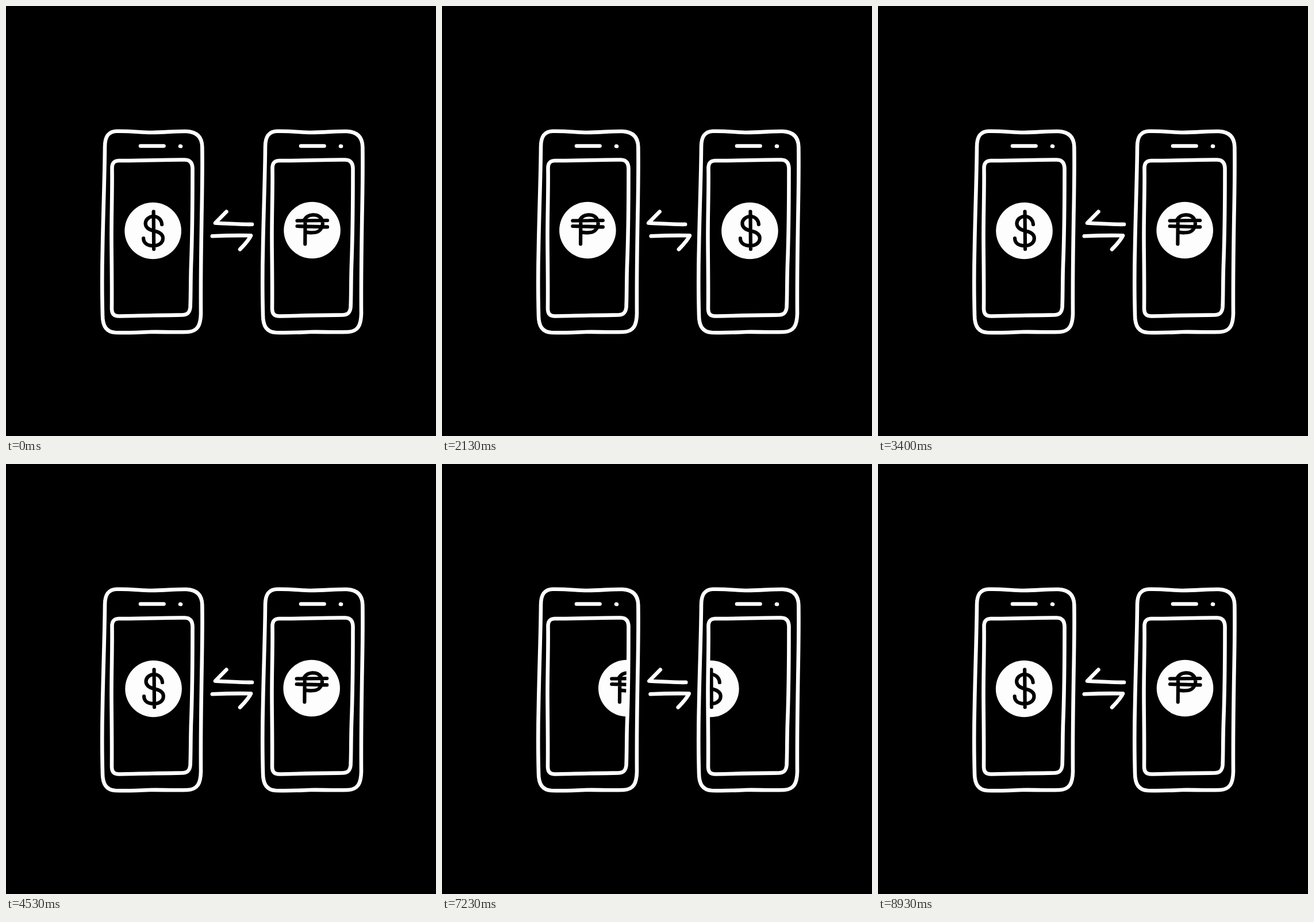
Animation, 748 px wide and 748 px high, one loop 9010 ms. Source, as an HTML page:

```html
<!DOCTYPE html>
<html lang="en">
<head>
<meta charset="utf-8">
<title>Currency swap</title>
<style>
  html, body { margin: 0; width: 100%; height: 100%; overflow: hidden; background: #000; }
  svg { display: block; width: 100%; height: 100%; }
  .line { fill: none; stroke: #fff; stroke-width: 6.6; stroke-linecap: round; stroke-linejoin: round; }
  .ink { fill: none; stroke: #000; stroke-width: 6.2; stroke-linecap: round; stroke-linejoin: round; }
  .disc { fill: #fdfdfd; }
</style>
</head>
<body>
<svg viewBox="0 0 748 748">
  <defs>
    <path id="glass" d="M184.5 284 C184 274 187 269.5 196 269 C235 269.5 275 267 311 267.5
      C321 267.5 325 274 324.5 286 C324.5 340 324 400 322 450 C321 480 321.5 505 320.5 524
      C319.5 534 315 537.5 306 537.5 C270 538 230 538.5 198 539.5 C188 540 184 536 184 526
      C184.5 480 183.5 430 183.5 400 C183.5 360 185 320 184.5 284 Z"/>
    <clipPath id="screen"><use href="#glass"/></clipPath>
    <g id="phone" class="line">
      <path d="M172 245 C172 227 178 218.5 192 217.8 C215 217 235 220 252 220 C275 220 295 217.5 314 218
        C332 219 341 228 341.3 245 C342 290 341 330 340.3 370 C339.5 420 338.5 470 339 535
        C338.5 556 333 566 316 567 C290 568 270 566.5 250 567 C230 568 205 568.5 190 568
        C174 567 168 556 168 538 C167 500 167 460 168 420 C169 360 171.5 300 172 245 Z"/>
      <use href="#glass"/>
      <path d="M234 243.5 L274.5 243.5 M303 243.8 L304 244"/>
    </g>
    <g id="dollar">
      <circle class="disc" r="49.3"/>
      <path class="ink" d="M15.5 -11 C15 -19 9 -25 1 -25 C-7 -25 -13.5 -19 -13 -12 C-12.5 -5 -7 -2 1 0
        C10 2 17.3 5 17.3 13 C17.3 21 10 26 1 26 C-9 26 -16.5 22 -16.5 13 M1 -33.5 L1.5 32"/>
    </g>
    <g id="peso">
      <circle class="disc" r="49.3"/>
      <path class="ink" d="M-12 -17 L-12.3 24 M-13.5 -18 C-8 -29 10 -29.5 16 -20 C22 -9 15 3.5 4 4
        C-2 4.5 -8 4.5 -12 3 M-26 -16.5 L26.5 -17 M-26 -7 L26.5 -5.7"/>
    </g>
  </defs>

  <rect width="748" height="748" fill="#000"/>
  <g>
    <g clip-path="url(#screen)">
      <use href="#dollar" class="dollar"/>
      <use href="#peso" class="peso"/>
    </g>
    <use href="#phone"/>
  </g>
  <g transform="translate(279 0)">
    <g clip-path="url(#screen)">
      <use href="#dollar" class="dollar" data-shift="279"/>
      <use href="#peso" class="peso" data-shift="279"/>
    </g>
    <use href="#phone"/>
  </g>
  <path id="top" class="line" d="M428 379.8 C410 380.3 385 378.3 364 377.5 L383.5 357.8"/>
  <path id="bottom" class="line" d="M358.8 400.3 C380 399.3 405 398.8 426 399.3 C422 408 414 416 407 423.3"/>
</svg>
<script>
  const LOOP = 9010, HALF = 2250, MOVE = 1500, START = -200;
  const dollars = document.querySelectorAll('.dollar');
  const pesos = document.querySelectorAll('.peso');
  const [upper, lower] = ['top', 'bottom'].map(id => document.getElementById(id));

  // cubic-bezier(.9, 0, .1, 1), solved by bisection
  function ease(u) {
    if (u <= 0) return 0;
    if (u >= 1) return 1;
    let lo = 0, hi = 1, s = 0.5;
    for (let i = 0; i < 30; i++) {
      s = (lo + hi) / 2;
      const r = 1 - s;
      if (2.7 * s * r * r + 0.3 * s * s * r + s * s * s < u) lo = s; else hi = s;
    }
    return s * s * (3 - 2 * s);
  }

  // 0: dollar on the left, 1: dollar on the right
  function progress(t) {
    const since = (t - START) % (2 * HALF);
    return since < HALF ? ease(since / MOVE) : 1 - ease((since - HALF) / MOVE);
  }

  // The picture updates twice per 100 ms: at 0 and at 30
  function tick(ms) {
    const t = Math.min(ms % LOOP, 8930), rest = t % 100;
    return t - rest + (rest >= 30 ? 30 : 0);
  }

  const place = (nodes, x, y) => nodes.forEach(n =>
    n.setAttribute('transform', `translate(${x - (n.dataset.shift || 0)} ${y})`));

  function draw(ms) {
    const p = progress(tick(ms));
    place(dollars, 253.2 + 282.6 * p, 391);
    place(pesos, 535 - 282 * p, 390);
    upper.setAttribute('transform', `translate(${-4.9 * p} 0)`);
    lower.setAttribute('transform', `translate(${4.9 * p} 0)`);
  }

  const begin = performance.now();
  function frame() {
    draw(performance.now() - begin);
    requestAnimationFrame(frame);
  }
  frame();
</script>
</body>
</html>
```
